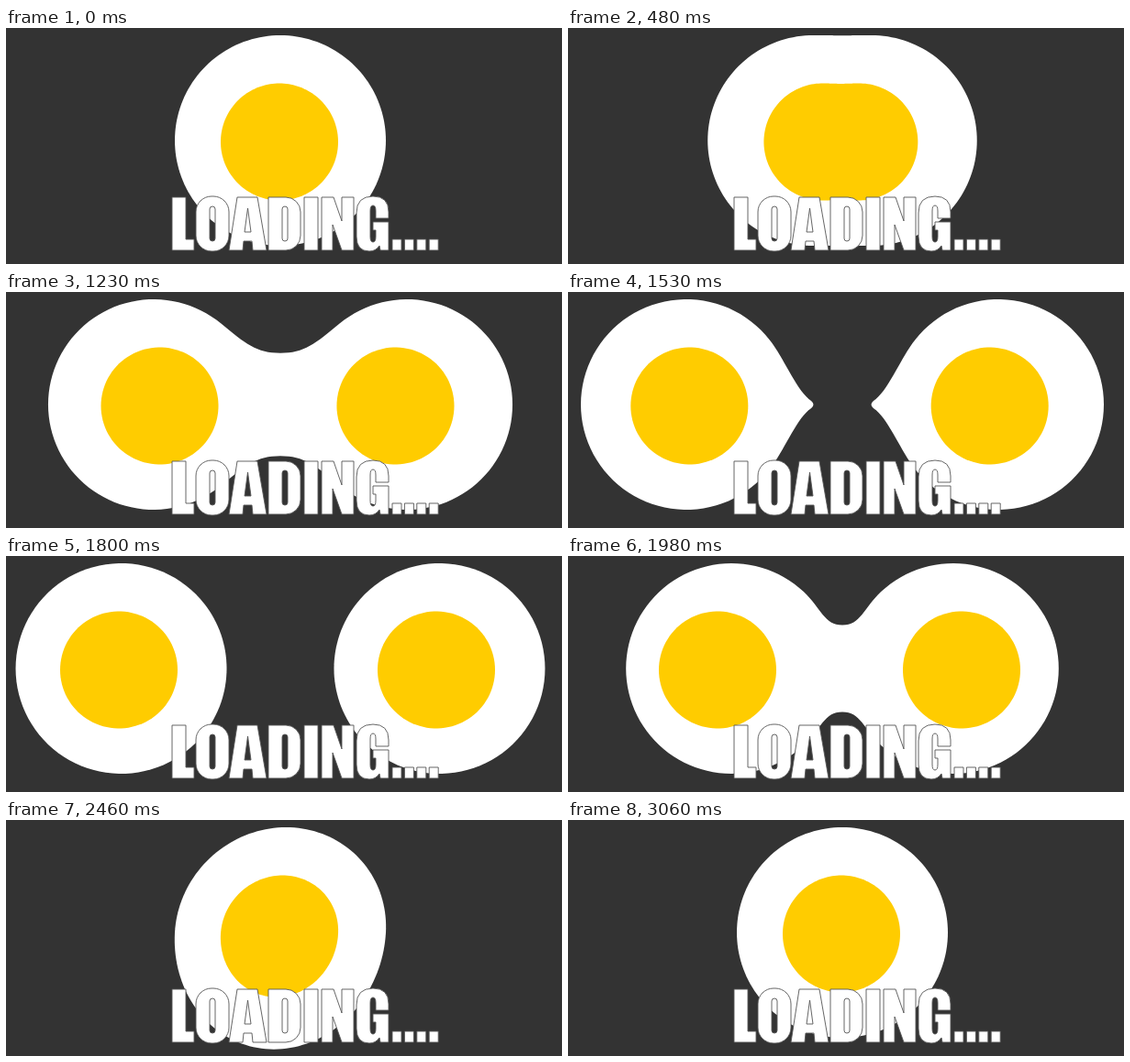
These frames come from a looping animation (606 px wide and 258 px high, 3.09 s). An HTML page with a canvas:

```html
<!DOCTYPE html>
<html lang="en">
<head>
<meta charset="utf-8">
<title>Loading</title>
<style>
  html, body { margin: 0; width: 100%; height: 100%; overflow: hidden; background: #333; }
  canvas { position: absolute; left: 0; top: 0; }
  .label { position: absolute; left: 181px; top: 180px; margin: 0; color: transparent;
    font: 700 48px/1.2 "Liberation Sans", sans-serif; }
</style>
</head>
<body>
<p class="label">LOADING....</p>
<canvas id="stage" width="606" height="258" aria-hidden="true"></canvas>
<script>
const LOOP = 3090, STEP = 30;
const PART_END = 1800, RETURN = 1740, RETURN_TIME = 500, SWELL = 2070, SWELL_TIME = 990;
const ctx = document.getElementById('stage').getContext('2d');

const clamp = v => Math.max(0, Math.min(1, v));
const smooth = u => u * u * (3 - 2 * u);

// reach: widest half distance; snap: distance, in radii, at which the bridge tears.
const white = { color: '#fff', r: 115, x: 299, y: 123, shift: 0,
  reach: 181, delay: 0, fall: 1.5, snap: 1.42, sag: .113, lean: .5 };
const yolk = { color: '#fc0', r: 64, x: 298, y: 124.5, shift: 2,
  reach: 176, delay: 130, fall: 1.92, snap: 1.1, sag: .08, lean: .7 };

function pose(part, t) {
  const { r, reach, delay, fall, snap, sag } = part;
  const out = smooth(clamp((t - delay) / (PART_END - delay)));
  const back = 1 - clamp((t - RETURN) / RETURN_TIME) ** fall;
  const apart = reach * Math.min(out, back);
  const limit = r * (t < RETURN ? snap : 1.2);
  const neck = r * (1 - (apart / limit) ** 4);
  const tip = (apart - r) * clamp(1 - 14 * (apart / limit - 1));
  const swell = Math.sin(Math.PI * clamp((t - SWELL) / SWELL_TIME) ** .6);
  return { apart, neck, tip, sag: sag * swell };
}

function curve(out, a, b, c, d) {
  for (let i = 1; i <= 16; i++) {
    const u = i / 16, v = 1 - u;
    out.push([0, 1].map(k =>
      v * v * v * a[k] + 3 * v * v * u * b[k] + 3 * v * u * u * c[k] + u * u * u * d[k]));
  }
}

// Upper left quarter of the outline, from the outer side to the middle.
function quarter(r, { apart, neck, tip }) {
  const joined = neck > 0;
  const ratio = Math.max(0, neck) / r;
  let turn = (38 + 52 * ratio * ratio) * Math.PI / 180;
  if (joined) turn = Math.max(turn, Math.acos(Math.min(1, .9 * apart / r)));
  const pts = [];
  for (let i = 0; i <= 40; i++) {
    const a = Math.PI + (turn - Math.PI) * i / 40;
    pts.push([r * Math.cos(a) - apart, -r * Math.sin(a)]);
  }
  const start = pts[pts.length - 1];
  const ahead = n => [start[0] + n * Math.sin(turn), start[1] + n * Math.cos(turn)];
  if (joined) {
    const len = Math.hypot(start[0], start[1] + neck);
    curve(pts, start, ahead(len * .48), [-len * .36, -neck], [0, -neck]);
    return pts;
  }
  const size = r / white.r, k = 4 / 3 * Math.tan(turn / 4) * r;
  const p = Math.max(0, tip);
  const b = Math.min(1, p / (20 * size)), s = b * size;
  const x = r - apart + p;
  const end = [x - 5 * s, -6 * s];
  curve(pts, start, ahead(k), [x - 20 * s, -(k * (1 - b) + 19 * s)], end);
  curve(pts, end, [x - 2 * s, -4 * s], [x, -2 * s], [x, 0]);
  return pts;
}

function fill(color, pts) {
  ctx.fillStyle = color;
  ctx.beginPath();
  pts.forEach(([x, y]) => ctx.lineTo(x, y));
  ctx.fill();
}

function blob(part, t) {
  const now = pose(part, t), { color, r } = part;
  const base = quarter(r, now);
  const mid = part.x - part.shift * clamp(now.apart / r);
  const side = (sx, sy) => base.map(([x, y]) => {
    const py = y * sy * (sy < 0 ? 1 + now.sag : 1);
    return [mid + x * sx - part.lean * now.sag * py, part.y + py];
  });
  const left = [...side(1, -1).reverse(), ...side(1, 1)];
  const right = [...side(-1, 1).reverse(), ...side(-1, -1)];
  if (now.neck > 0) {
    fill(color, [...left, ...right]);
  } else {
    fill(color, left);
    fill(color, right);
  }
}

// Heavy condensed lettering: caps stand between TOP and BASE.
const TOP = 185, BASE = 243;

function lettering() {
  const word = new Path2D();
  const bar = (x, w, h = BASE - TOP) => word.rect(x, BASE - h, w, h);
  const slot = x => word.roundRect(x, TOP + 10, 6, 38, 3);
  const shape = d => word.addPath(new Path2D(d));
  shape(`M181 ${TOP}h15v46h9v12h-24z`);
  word.roundRect(207, TOP - 1, 36, 60, 17);
  slot(222);
  shape(`M252 ${TOP}h22l10 58h-15l-1-10h-9l-1 10h-15zm8 38h7l-3.500-26z`);
  word.roundRect(286, TOP, 35, 58, [0, 16, 16, 0]);
  slot(301);
  bar(325, 15);
  shape(`M344 ${TOP}h13l9 26v-26h13v58h-13l-10-28v28h-12z`);
  shape('M417 208h-14v-8q0-6-3-6t-3 6v28q0 6 3 6t3-6v-7h-3v-9h17v31h-9l-1-5' +
    'q-4 6-11 6-14 0-14-16v-26q0-18 18-18 17 0 17 17z');
  for (let i = 0; i < 4; i++) bar(421 + 13.4 * i, 10, 12);
  return word;
}
const word = lettering();

let begin;
function draw(now) {
  begin ??= now;
  const t = Math.floor(((now - begin) % LOOP) / STEP) * STEP;
  ctx.fillStyle = '#333';
  ctx.fillRect(0, 0, 606, 258);
  blob(white, t);
  blob(yolk, t);
  ctx.fillStyle = '#fff';
  ctx.fill(word, 'evenodd');
  ctx.strokeStyle = '#555';
  ctx.lineWidth = .9;
  ctx.stroke(word);
  requestAnimationFrame(draw);
}
requestAnimationFrame(draw);
</script>
</body>
</html>
```
